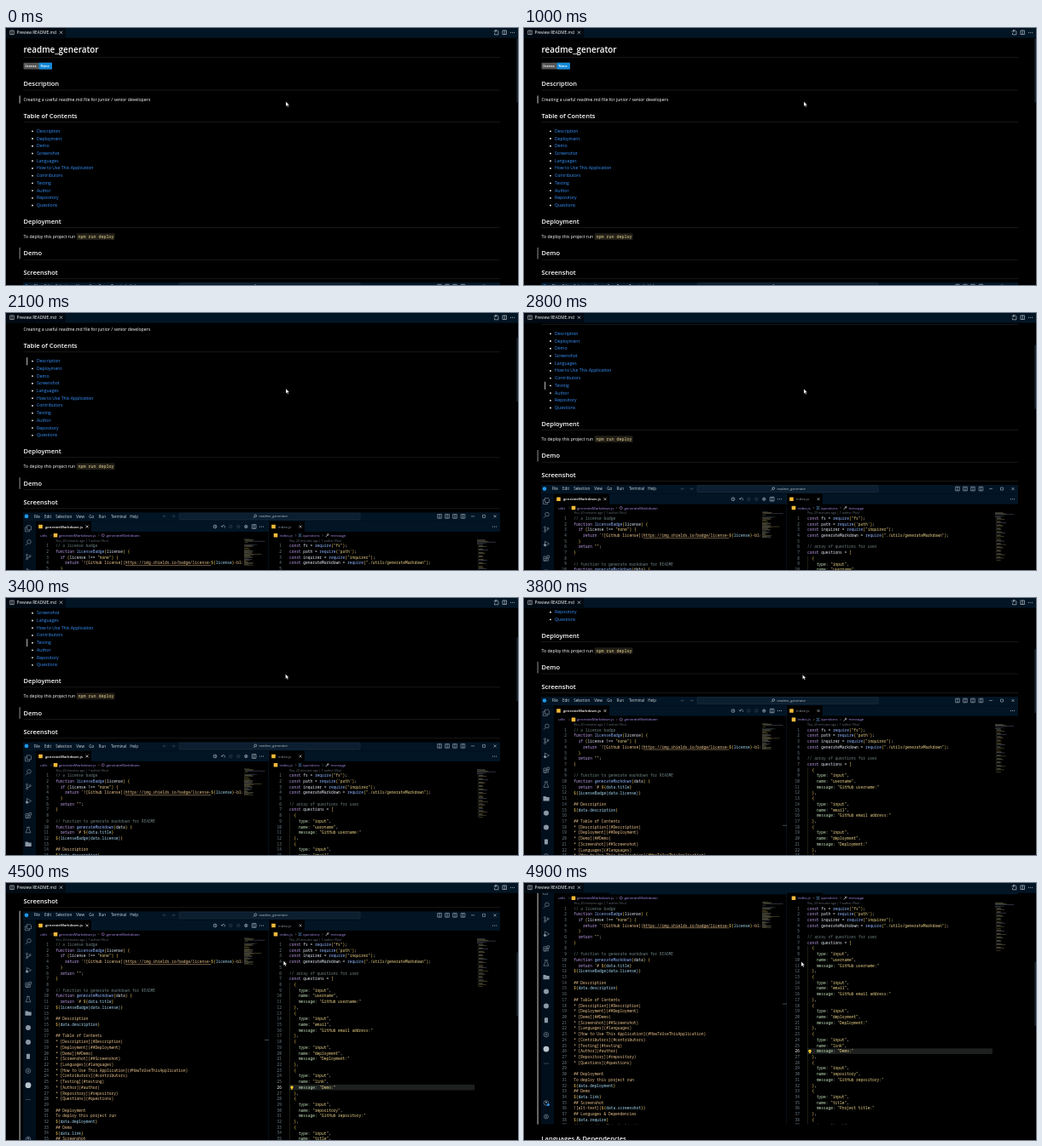
An HTML page for the animation above (5000 ms loop, 600 by 302 pixels).

```html
<!DOCTYPE html>
<html lang="en">
<head>
<meta charset="utf-8">
<title>README preview</title>
<style>
html, body { margin: 0; width: 100%; height: 100%; overflow: hidden; background: #000; }
svg { display: block; width: 100%; height: 100%; }
text { white-space: pre; font-family: "Open Sans", "Noto Sans", sans-serif; }
text.mono { font-family: "Noto Sans Mono", "DejaVu Sans Mono", monospace; font-weight: 500; }
</style>
</head>
<body>
<svg id="stage" viewBox="0 0 600 302">
  <defs>
    <clipPath id="shotClip"><rect x="20" y="75.7" width="559" height="293"/></clipPath>
    <clipPath id="leftClip"><rect x="36" y="98" width="240.5" height="274"/></clipPath>
  </defs>
</svg>
<script>
const stage = document.getElementById('stage');
const LOOP = 5000, STEP = 100;
const LINK = '#3794ff', BAR = '#021525';

function add(parent, tag, attrs = {}, content) {
  const node = document.createElementNS('http://www.w3.org/2000/svg', tag);
  for (const key in attrs) node.setAttribute(key, attrs[key]);
  if (content !== undefined) node.textContent = content;
  parent.appendChild(node);
  return node;
}
const rect = (p, x, y, width, height, fill, more) =>
  add(p, 'rect', { x, y, width, height, fill, ...more });
const circle = (p, cx, cy, r, fill) => add(p, 'circle', { cx, cy, r, fill });
const stroke = (p, d, color, width = 0.6) =>
  add(p, 'path', { d, fill: 'none', stroke: color, 'stroke-width': width });
// y is the visual middle of the line
const label = (p, x, y, size, fill, content, more) =>
  add(p, 'text', { x, y: y + size * 0.36, 'font-size': size, fill, ...more }, content);
const cross = (p, x, y, color, r = 1.5) =>
  stroke(p, `M${x - r} ${y - r}l${2 * r} ${2 * r}m0 ${-2 * r}l${-2 * r} ${2 * r}`, color);
const dots = (p, x, y, color) => {
  for (const dx of [-2, 0, 2]) circle(p, x + dx, y, 0.5, color);
};
const splitIcon = (p, x, y, color) =>
  stroke(p, `M${x - 2.3} ${y - 2.3}h4.6v4.6h-4.6zM${x} ${y - 2.3}v4.6`, color);

const page = add(stage, 'g');

function heading(content, y, size = 7.5) {
  label(page, 20.5, y, size, '#fff', content, { 'font-weight': 600 });
  rect(page, 20.5, y + (size > 8 ? 8.7 : 7.3), 558.5, 0.5, '#2e2e2e');
}

function buildReadme() {
  heading('readme_generator', 25.5, 9.9);
  rect(page, 20.5, 40.8, 33.5, 7.6, '#555', { rx: 1 });
  rect(page, 38.5, 40.8, 15.5, 7.6, '#1389d8', { rx: 1 });
  label(page, 22.5, 44.6, 4, '#fff', 'license', { 'font-weight': 600 });
  label(page, 40.5, 44.6, 4, '#fff', 'None', { 'font-weight': 600 });
  heading('Description', 65.5);
  label(page, 20.5, 84, 5.13, '#fff',
    'Creating a useful readme.md file for junior / senior developers');
  heading('Table of Contents', 103);
  ['Description', 'Deployment', 'Demo', 'Screenshot', 'Languages', 'How to Use This Application',
    'Contributors', 'Testing', 'Author', 'Repository', 'Questions'].forEach((item, i) => {
    const y = 121 + i * 8.72;
    circle(page, 31, y + 0.3, 0.9, '#fff');
    label(page, 36, y, 5.13, LINK, item);
  });
  heading('Deployment', 227);
  label(page, 20.5, 245.3, 5.13, '#fff', 'To deploy this project run');
  rect(page, 82.7, 241.3, 44.8, 7.6, '#221f17', { rx: 1 });
  label(page, 84.4, 245.2, 5, '#e8d596', 'npm run deploy', { class: 'mono' });
  heading('Demo', 264.6);
  rect(page, 15.6, 258, 1, 13.5, '#8f8f8f');
  heading('Screenshot', 287);
  heading('Languages & Dependencies', 608.5);
}

// --- nested editor window ---
const COLORS = {
  comment: '#6c8080', string: '#ecd488', keyword: '#c3a0f0', call: '#8fb4ff',
  key: '#c4e4bc', brace: '#ffd75e', plain: '#e2e8f2',
  template: '#ecc48d', variable: '#a6dcf8'
};
const TOKENS = /(?<comment>\/\/.*)|(?<string>"[^"]*"|'[^']*')|(?<keyword>\b(?:const|function|if|return)\b)|(?<call>\w+(?=\())|(?<key>\w+:)|(?<brace>[{}()[\]])|(?<plain>[\s\S])/g;

function span(parent, content, fill, more) {
  add(parent, 'tspan', { fill, ...more }, content);
}
function paintCode(parent, source) {
  for (const m of source.matchAll(TOKENS)) {
    const kind = Object.keys(m.groups).find(k => m.groups[k] !== undefined);
    span(parent, m[0], COLORS[kind]);
  }
}
function paintTemplate(parent, source) {
  for (const part of source.split(/(\$\{[^}]*\}|https:.*?(?=\$))/)) {
    if (!part) continue;
    if (part.startsWith('${')) {
      span(parent, '${', COLORS.brace);
      span(parent, part.slice(2, -1), COLORS.variable);
      span(parent, '}', COLORS.brace);
    } else {
      const more = part.startsWith('https') ? { 'text-decoration': 'underline' } : {};
      span(parent, part, COLORS.template, more);
    }
  }
}

const contents = [['Description', 'Description'], ['Deployment', '#Deployment'], ['Demo', '#Demo'],
  ['Screenshot', '#Screenshot'], ['Languages', 'languages'],
  ['How to Use This Application', 'HowToUseThisApplication'], ['Contributors', 'contributors'],
  ['Testing', 'testing'], ['Author', 'author'], ['Repository', 'repository'],
  ['Questions', 'questions']].map(([name, id]) => `* [${name}](#${id})`);

const markdownLines = [
  '// a license badge',
  'function licenseBadge(license) {',
  '  if (license !== "none") {',
  '    return `![Github license](https://img.shields.io/badge/license-${license}-blue.svg)`',
  '  }',
  '  return "";',
  '}',
  '',
  '// function to generate markdown for README',
  'function generateMarkdown(data) {',
  '  return `# ${data.title}',
  '${licenseBadge(data.license)}',
  '',
  '## Description',
  '${data.description}',
  '',
  '## Table of Contents',
  ...contents,
  '',
  '## Deployment',
  'To deploy this project run',
  '${data.deployment}',
  '## Demo',
  '${data.link}',
  '## Screenshot',
  '![alt-text](${data.screenshot})',
  '## Languages & Dependencies',
  '${data.require}',
  '## How to Use This Application'
];

const question = ([name, message]) => ['  {', '    type: "input",', `    name: "${name}",`,
  `    message: "${message}:"`, '  },'];
const indexLines = [
  'const fs = require("fs");',
  "const path = require('path');",
  'const inquirer = require("inquirer");',
  'const generateMarkdown = require("./utils/generateMarkdown");',
  '',
  '// array of questions for user',
  'const questions = [',
  ...[['username', 'GitHub username'], ['email', 'GitHub email address'],
    ['deployment', 'Deployment'], ['link', 'Demo'], ['repository', 'GitHub repository'],
    ['title', 'Project title']].flatMap(question),
  '  {',
  '    type: "input",'
];

const CODE_TOP = 115, ROW = 6.71;
const rowY = line => CODE_TOP + (line - 1) * ROW;

function codePane(parent, lines, x, numberX, activeLine, templateFrom) {
  lines.forEach((line, i) => {
    const y = rowY(i + 1);
    label(parent, numberX, y, 4.5, i + 1 === activeLine ? '#fff' : '#71848f', i + 1,
      { class: 'mono', 'text-anchor': 'end' });
    const row = label(parent, x, y, 4.54, COLORS.plain, '', { class: 'mono' });
    const tick = line.indexOf('`');
    if (i >= templateFrom) paintTemplate(row, line);
    else if (tick >= 0) {
      paintCode(row, line.slice(0, tick));
      paintTemplate(row, line.slice(tick));
    } else paintCode(row, line);
  });
}

function minimap(parent, x, y, lines, rowHeight) {
  lines.forEach((line, i) => {
    const indent = line.search(/\S/);
    if (indent < 0) return;
    const fill = line.startsWith('//') ? '#4c5b5b' : i % 3 ? '#8d844f' : '#6f7894';
    rect(parent, x + indent * 0.4, y + i * rowHeight, Math.min(23, (line.length - indent) * 0.36),
      0.5, fill, { opacity: 0.8 });
  });
}

const fileIcon = (p, x, y) => rect(p, x - 2.3, y - 2.3, 4.6, 4.6, '#f0b93a', { rx: 0.5 });
const chevron = (p, x, y) => stroke(p, `M${x - 0.6} ${y - 1.2}l1.2 1.2l-1.2 1.2`, '#8a8fa8', 0.4);
const ring = (p, x, y, color, r = 1.9) =>
  add(p, 'circle', { cx: x, cy: y, r, fill: 'none', stroke: color, 'stroke-width': 0.6 });

function titleBar(g) {
  const y = 80.4;
  rect(g, 20, 75.7, 559, 10.5, BAR);
  circle(g, 24, y, 2.3, '#2196e8');
  [['File', 32.7], ['Edit', 45], ['Selection', 58.2], ['View', 82.2], ['Go', 97.3], ['Run', 108.6],
    ['Terminal', 123], ['Help', 145.3]].forEach(([name, x]) => label(g, x, y, 4.5, '#d4dce2', name));
  stroke(g, `M188 ${y}h-4m1.5 -1.5l-1.5 1.5l1.5 1.5M194 ${y}h4m-1.5 -1.5l1.5 1.5l-1.5 1.5`, '#4a5763', 0.5);
  rect(g, 203, 76.4, 212, 8, '#0b1f30', { rx: 1.2, stroke: '#2b3d4c', 'stroke-width': 0.4 });
  ring(g, 292.3, y - 0.5, '#c8d0d8', 1.4);
  stroke(g, `M291.3 ${y + 0.5}l-1.5 1.6`, '#c8d0d8', 0.5);
  label(g, 296.5, y, 3.9, '#b4bec8', 'readme_generator');
  for (const x of [508, 517, 526, 535.5]) splitIcon(g, x, y, '#b4bec8');
  stroke(g, `M545 ${y}h4M558.5 ${y - 1.5}h3v3h-3z`, '#c8d0d8', 0.5);
  cross(g, 573, y, '#c8d0d8');
}

function tabsAndCrumbs(g) {
  const tabY = 92.5, crumbY = 102.8, crumbColor = '#a98ef0';
  rect(g, 35, 86.2, 544, 12.2, BAR);
  rect(g, 35, 86.2, 65, 12.2, '#000');
  rect(g, 308, 86.2, 42, 12.2, '#000');
  fileIcon(g, 40.5, tabY);
  label(g, 46, tabY, 4.2, '#fff', 'generateMarkdown.js', { 'font-weight': 600 });
  cross(g, 95, tabY, '#fff');
  ring(g, 245, tabY, '#c8d0d8');
  stroke(g, `M245 ${tabY - 1}v1.2h1M256 ${tabY + 1.6}a1.8 1.8 0 1 0 -3 -1.4m-1 -1.2l1 1.4l1.6 -.6`, '#c8d0d8', 0.5);
  ring(g, 263.3, tabY, '#465563', 1.6);
  ring(g, 272.3, tabY, '#465563', 1.6);
  ring(g, 281.3, tabY, '#c8d0d8', 1.7);
  circle(g, 281.3, tabY, 0.7, '#c8d0d8');
  splitIcon(g, 290.7, tabY, '#c8d0d8');
  dots(g, 299.5, tabY, '#c8d0d8');
  fileIcon(g, 313.5, tabY);
  label(g, 319, tabY, 4.35, '#8e9aa5', 'index.js');
  cross(g, 345, tabY, '#c8d0d8');
  dots(g, 572.5, tabY, '#c8d0d8');

  const crumb = (x, name) => label(g, x, crumbY, 4.3, crumbColor, name);
  crumb(40, 'utils');
  chevron(g, 53, crumbY);
  fileIcon(g, 58, crumbY);
  crumb(62, 'generateMarkdown.js');
  chevron(g, 108.6, crumbY);
  ring(g, 113.7, crumbY, '#b48ae0', 1.5);
  crumb(117.5, 'generateMarkdown');
  fileIcon(g, 316, crumbY);
  crumb(320.5, 'index.js');
  chevron(g, 339.5, crumbY);
  stroke(g, `M342.5 ${crumbY - 1.5}h1.5v3h-1.5m4 -3h-1.5v3h1.5`, '#64a8e8', 0.5);
  crumb(348, 'questions');
  chevron(g, 371, crumbY);
  stroke(g, `M374.7 ${crumbY + 1.7}l2.5 -2.5`, '#c8d0d8', 0.8);
  ring(g, 377.3, crumbY - 0.9, '#c8d0d8', 0.9);
  crumb(380.5, 'message');
  label(g, 58.5, 109, 3.6, '#65717a', 'You, 20 minutes ago | 1 author (You)');
  label(g, 332, 109, 3.6, '#65717a', 'You, 23 minutes ago | 1 author (You)');
}

function activityBar(g) {
  const tint = '#8b98a4';
  rect(g, 20, 86.2, 15, 286, '#010f1c');
  const at = i => 94.3 + i * 16.9;
  stroke(g, `M24.5 ${at(0) - 3}h4l1 1v4h-5zM24.5 ${at(0) - 1}h-2v5h5v-2`, tint);
  ring(g, 27, at(1) - 0.8, tint, 2.3);
  stroke(g, `M25.3 ${at(1) + 1}l-2.4 2.5`, tint);
  ring(g, 24.5, at(2) - 2.3, tint, 1);
  ring(g, 24.5, at(2) + 2.3, tint, 1);
  ring(g, 28.2, at(2) - 1, tint, 1);
  stroke(g, `M24.5 ${at(2) - 1.3}v2.6m0 -.3q3.5 0 3.7 -1.2`, tint);
  stroke(g, `M24.5 ${at(3) - 3}l5 3l-5 3z`, tint);
  circle(g, 24.5, at(3) + 1.5, 1.4, tint);
  stroke(g, `M23 ${at(4) - 2}h3v5h-3zm0 2.5h5.5v2.5h-5.5M27 ${at(4) - 3}h2.6v2.6h-2.6z`, tint);
  stroke(g, `M25 ${at(5) - 3}v2l-2 4.5h6l-2 -4.5v-2m-2.8 0h3.6`, tint);
  add(g, 'path', { d: `M22.5 ${at(6) - 2.7}h3l1 1h3.2v4.4h-7.2z`, fill: tint });
  for (const i of [7, 8]) circle(g, 26, at(i), 3, tint);
  rect(g, 24, at(9) - 3, 4, 6, tint, { rx: 0.6 });
  ring(g, 26, at(10), tint, 2.8);
  ring(g, 26, at(10), tint, 1);
  circle(g, 26, at(11), 3.4, '#b9c3cc');
  dots(g, 26, at(12), tint);
  ring(g, 26, 343.6, tint, 2.8);
  circle(g, 26, 342.8, 1, tint);
  circle(g, 28.4, 345.6, 1.6, '#2f8de4');
  ring(g, 26, 359.6, tint, 2.5);
  ring(g, 26, 359.6, tint, 0.9);
}

function buildScreenshot() {
  const g = add(add(page, 'g', { transform: 'translate(0 223.2)' }), 'g', { 'clip-path': 'url(#shotClip)' });
  const active = 26, activeY = rowY(active);
  rect(g, 20, 74.5, 559, 298, '#000');
  titleBar(g);
  tabsAndCrumbs(g);
  activityBar(g);
  rect(g, 307.6, 86.2, 0.5, 286, '#122536');
  rect(g, 303, 226.8, 5, 0.6, '#6d7780');
  rect(g, 332, activeY - 3.3, 217, 6.6, '#1d201f');
  rect(g, 332.2, rowY(7) + 4, 0.4, 230, '#4a4632');
  codePane(add(g, 'g', { 'clip-path': 'url(#leftClip)' }), markdownLines, 58.2, 50, 0, 11);
  codePane(g, indexLines, 332, 323, active, Infinity);
  circle(g, 335, activeY - 0.3, 1.7, '#ffd028');
  rect(g, 334.2, activeY + 1, 1.6, 1.5, '#ffd028');
  minimap(g, 279, 107, markdownLines, 0.8);
  minimap(g, 552, 108, [...indexLines, ...indexLines.slice(7)], 0.8);
}

buildReadme();
buildScreenshot();
const hoverMark = rect(page, 0, 0, 1, 9, '#c8c8c8');

// --- outer window ---
const thumb = rect(stage, 598.4, 0, 1.6, 75, '#1b2733');
rect(stage, 0, 0, 600, 11.6, BAR);
rect(stage, 0, 0, 70, 11.6, '#010a12');
splitIcon(stage, 7, 5.3, '#d0d6dc');
label(stage, 12.6, 5.3, 4.8, '#fff', 'Preview README.md');
cross(stage, 64.5, 5.2, '#fff', 1.6);
stroke(stage, 'M573 2.6h2.5l1.4 1.4v3.8h-4.4v-2M571.5 3.8h3m-1.2 -1.4l1.3 1.4l-1.3 1.4', '#d0d6dc');
splitIcon(stage, 584.2, 5.2, '#d0d6dc');
dots(stage, 593.5, 5.3, '#d0d6dc');
const pointer = add(stage, 'path', {
  d: 'M0 0v5.3l1.3 -1.1l.9 2l.9 -.4l-.9 -1.9h1.7z', fill: '#fff', stroke: '#222', 'stroke-width': 0.25
});

// --- motion: [time, value] points joined by straight lines ---
const SCROLL = [[0, 0], [1500, 0], [1600, 6], [1700, 19], [2100, 64.7], [2800, 97], [3100, 129.2],
  [3300, 129.2], [3400, 129.7], [4100, 223.2], [4900, 308.3]];
const POINTER_X = [[0, 328], [2700, 328], [3400, 327.6], [4100, 325.6], [4900, 325]];
const POINTER_Y = [[0, 86.6], [1300, 86.6], [1400, 88.8], [3400, 89.6], [4100, 90.6], [4900, 92.6]];
// marker beside the hovered block: [start, end, x, y, height]
const HOVERS = [[0, 1600, 15.6, 79.5, 9], [1800, 2200, 24.2, 117, 9], [2200, 2700, 24.2, 151.9, 9],
  [2700, 3500, 24.2, 177.8, 9], [4200, LOOP, 15.6, 298.5, 293.4]];

function track(points, t) {
  const i = points.findIndex(([time]) => time > t);
  if (i < 0) return points[points.length - 1][1];
  const [t0, v0] = points[i - 1], [t1, v1] = points[i];
  return v0 + (v1 - v0) * (t - t0) / (t1 - t0);
}

function render(now) {
  const t = Math.floor((now % LOOP) / STEP) * STEP;
  const scroll = track(SCROLL, t);
  page.setAttribute('transform', `translate(0 ${-scroll})`);
  thumb.setAttribute('y', 12.5 + scroll * 0.26);
  pointer.setAttribute('transform', `translate(${track(POINTER_X, t)} ${track(POINTER_Y, t)})`);
  const hover = HOVERS.find(([start, end]) => t >= start && t < end);
  hoverMark.setAttribute('visibility', hover ? 'visible' : 'hidden');
  if (hover) {
    const [, , x, y, height] = hover;
    for (const [key, value] of Object.entries({ x, y, height })) hoverMark.setAttribute(key, value);
  }
}

const begin = performance.now();
function tick() {
  render(performance.now() - begin);
  requestAnimationFrame(tick);
}
tick();
</script>
</body>
</html>
```
